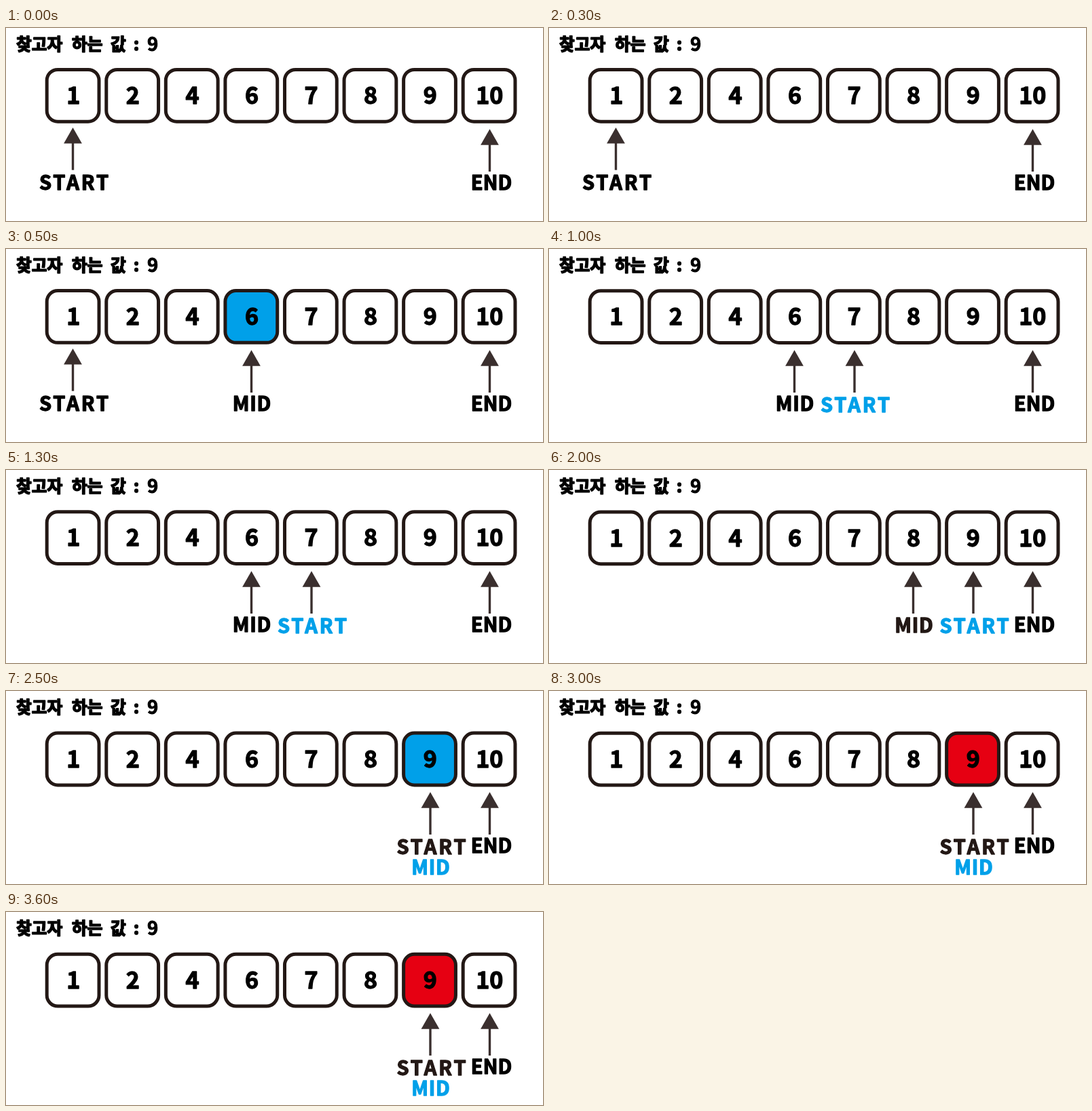
Animation, 791 px wide and 285 px high, one loop 4000 ms. Source, as an HTML page with a canvas:

```html
<!DOCTYPE html>
<html lang="ko">
<head>
<meta charset="utf-8">
<title>Binary search</title>
<style>
html, body { margin: 0; width: 100%; height: 100%; overflow: hidden; background: #fff; }
canvas { display: block; }
</style>
</head>
<body>
<canvas id="stage" width="791" height="285"></canvas>
<script>
const ctx = document.getElementById('stage').getContext('2d');
const FONT = '"Noto Sans CJK KR", "Noto Sans CJK", sans-serif';
const BLACK = '#000', INK = '#231815', ARROW = '#3a2f2e', BLUE = '#00a0e9', RED = '#e60012';
const VALUES = [1, 2, 4, 6, 7, 8, 9, 10];
const TITLE = [['찾고자', 15], ['하는', 97], ['값', 154], [':', 188]];

const start = (x, y, color) => ({ text: 'START', x, y, color, spacing: 3 });
const mid = (x, y, color) => ({ text: 'MID', x, y, color, spacing: 0.7 });

const first = start(100, 238.5, BLACK), firstMid = mid(362, 238.5, BLACK);
const found = {
  arrows: [625],
  labels: [start(626.5, 240.5, INK), mid(625.5, 270.5, BLUE)]
};

// One entry per step; cell and fill mark the highlighted box.
const STEPS = [
  { at: 0, arrows: [98.5], labels: [first] },
  { at: 500, arrows: [98.5, 361.5], labels: [first, firstMid], cell: 3, fill: BLUE },
  { at: 1000, arrows: [361.5, 450], labels: [firstMid, start(451, 240.5, BLUE)] },
  { at: 1500, arrows: [450, 541], labels: [start(451, 240.5, INK), mid(542, 239.5, BLUE)], cell: 5, fill: BLUE },
  { at: 2000, arrows: [536.5, 625], labels: [mid(537.5, 239.5, INK), start(626.5, 240.5, BLUE)] },
  { at: 2500, ...found, cell: 6, fill: BLUE },
  { at: 3000, ...found, cell: 6, fill: RED }
];
const LOOP = 4000;

// The outline thickens the bold face to a heavy one.
function write(text, x, y, size, { color = BLACK, align = 'center', spacing = 0, outline = 1.3 } = {}) {
  ctx.font = `900 ${size}px ${FONT}`;
  ctx.letterSpacing = spacing + 'px';
  ctx.textAlign = align;
  ctx.fillStyle = ctx.strokeStyle = color;
  ctx.lineWidth = outline;
  ctx.lineJoin = 'round';
  const left = x + (align === 'center' ? spacing / 2 : 0);
  ctx.fillText(text, left, y);
  ctx.strokeText(text, left, y);
}

function drawBox(i, dy, fill) {
  const x = 98.6 + 87.57 * i, y = 99.8 + dy;
  ctx.beginPath();
  ctx.roundRect(x - 38.4, y - 38.4, 76.8, 76.8, 16);
  ctx.fillStyle = fill;
  ctx.fill();
  ctx.strokeStyle = INK;
  ctx.lineWidth = 5;
  ctx.stroke();
  write(VALUES[i], x + 0.7, 112 + dy, 34);
}

function drawArrow(x) {
  const y = x < 100 ? 147 : 149.3;
  ctx.fillStyle = ARROW;
  ctx.beginPath();
  ctx.moveTo(x, y);
  ctx.lineTo(x + 13.4, y + 23.5);
  ctx.lineTo(x - 13.4, y + 23.5);
  ctx.fill();
  ctx.fillRect(x - 1.7, y + 22, 3.4, 40.7);
}

function draw(step) {
  ctx.fillStyle = '#fff';
  ctx.fillRect(0, 0, 791, 285);
  for (const [word, x] of TITLE) write(word, x, 33, 24.7, { align: 'left', outline: 1.6 });
  write('9', 216, 34, 27.5, { outline: 1 });
  const dy = step.at / 3500;
  VALUES.forEach((_, i) => drawBox(i, dy, i === step.cell ? step.fill : '#fff'));
  [...step.arrows, 712.5].forEach(drawArrow);
  for (const { text, x, y, ...style } of step.labels) write(text, x, y, 29, style);
  write('END', 715, 238.5, 29);
}

const origin = performance.now();
function tick() {
  const t = Math.max(0, performance.now() - origin) % LOOP;
  draw(STEPS.findLast(step => step.at <= t));
  requestAnimationFrame(tick);
}
tick();
</script>
</body>
</html>
```
